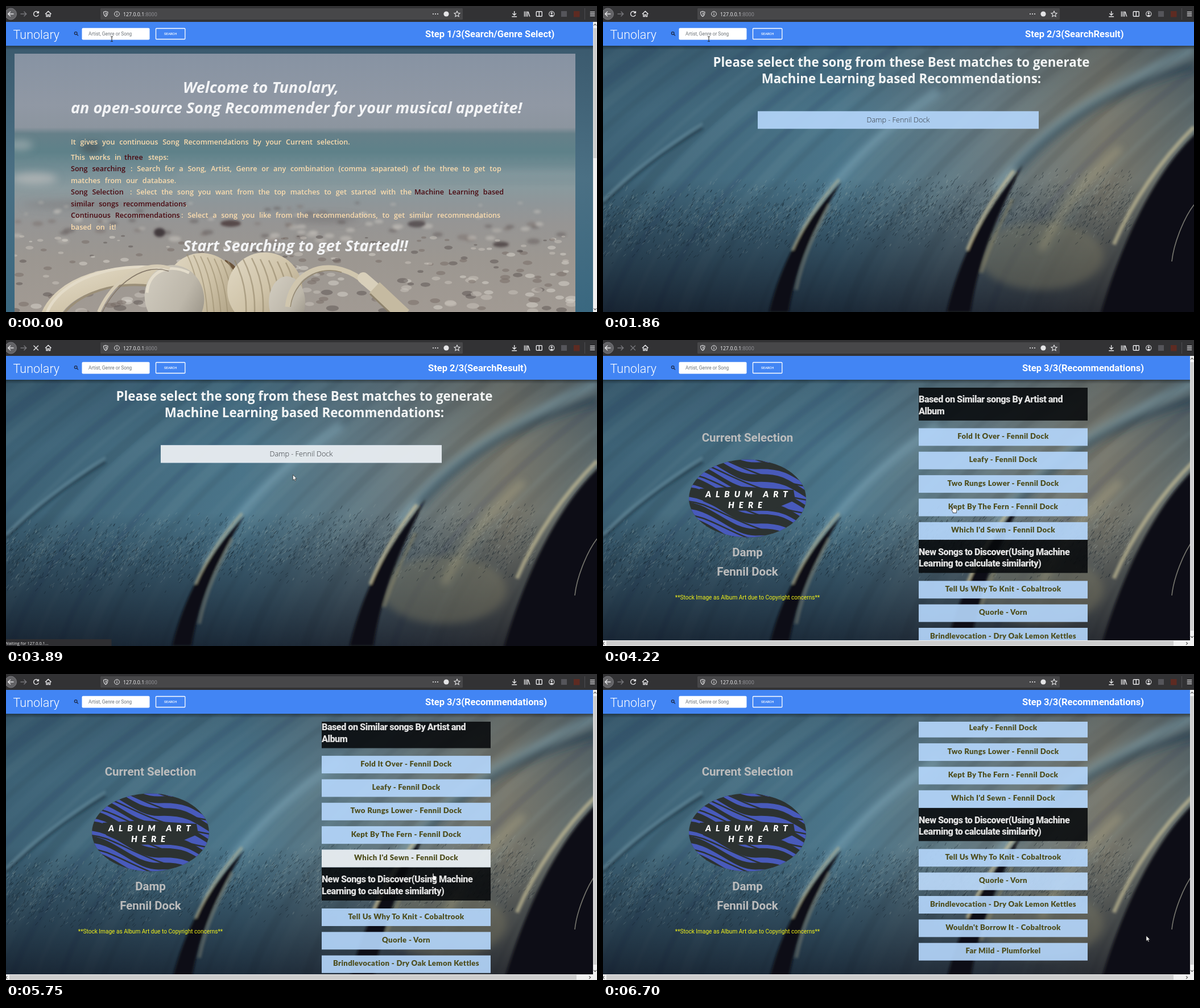
These frames come from a looping animation (1039x539 px, 6780 ms). An HTML page:

```html
<!DOCTYPE html>
<html lang="en">
<head>
<meta charset="utf-8">
<title>Song recommender</title>
<style>
html, body { margin: 0; width: 100%; height: 100%; overflow: hidden; background: #323234; }
svg { display: block; width: 100vw; height: 100vh; }
text { white-space: pre; }
.rb { font-family: Roboto, sans-serif; }
.os { font-family: "Open Sans", sans-serif; }
.hero { font: italic 700 27.1px "Open Sans", sans-serif; fill: #f3f4f6; }
.note { font: 600 12.6px "Open Sans", sans-serif; word-spacing: 4.5px; }
.pick { font: 700 22.3px "Open Sans", sans-serif; fill: #f4f6f6; text-anchor: middle; }
.song { font: 900 13.2px Lato, sans-serif; letter-spacing: .35px; fill: #4d4d1c; text-anchor: middle; }
.head { font: 900 16.2px Roboto, sans-serif; letter-spacing: -.5px; fill: #e2e2e2; }
.side { font: 700 20.5px Roboto, sans-serif; fill: #bcbcbc; text-anchor: middle; }
.art { font: italic 900 15px Lato, sans-serif; letter-spacing: 8px; fill: #fff; }
.icon { fill: none; stroke: #e4e4e6; stroke-width: 1.4; }
</style>
</head>
<body>
<svg id="stage" viewBox="0 0 1039 539" preserveAspectRatio="none"></svg>
<script>
const LOOP = 6780;
const BRAND = 'Tunolary', SONG = 'Damp', BAND = 'Fennil Dock';
const QUERY = 'damp, metal';
const BY_ARTIST = ['Fold It Over', 'Leafy', 'Two Rungs Lower', 'Kept By The Fern', "Which I'd Sewn"]
  .map(s => `${s} - ${BAND}`);
const DISCOVER = ['Tell Us Why To Knit - Cobaltrook', 'Quorle - Vorn', 'Brindlevocation - Dry Oak Lemon Kettles',
  "Wouldn't Borrow It - Cobaltrook", 'Far Mild - Plumforkel'];

let seed = 7;
const rnd = () => (seed = (seed * 16807) % 2147483647) / 2147483647;
const times = (n, f) => Array.from({ length: n }, (_, i) => f(i)).join('');
const rect = (x, y, w, h, fill, more = '') =>
  `<rect x="${x}" y="${y}" width="${w}" height="${h}" fill="${fill}" ${more}/>`;
const text = (x, y, s, more = '') => `<text x="${x}" y="${y}" ${more}>${s}</text>`;
const line = (d, color, w, more = '') =>
  `<path d="${d}" fill="none" stroke="${color}" stroke-width="${w}" ${more}/>`;
const shape = (d, fill, more = '') => `<path d="${d}" fill="${fill}" ${more}/>`;
const oval = (x, y, rx, ry, fill, more = '') =>
  `<ellipse cx="${x}" cy="${y}" rx="${rx}" ry="${ry}" fill="${fill}" ${more}/>`;
const grad = (id, x2, y2, stops) => `<linearGradient id="${id}" x1="0" y1="0" x2="${x2}" y2="${y2}">` +
  stops.map(([o, c, a = 1]) => `<stop offset="${o}" stop-color="${c}" stop-opacity="${a}"/>`).join('') +
  '</linearGradient>';
const blur = (id, s) => `<filter id="${id}" x="-30%" y="-30%" width="160%" height="160%">
  <feGaussianBlur stdDeviation="${s}"/></filter>`;

const defs = `<defs>
  ${grad('tone', 1, 0, [[0, '#3f6579'], [.4, '#4e7a8f'], [.65, '#6b7e85'], [.85, '#7f7d70'], [1, '#5f6b6c']])}
  ${grad('depth', 0, 1, [[0, '#1c3144', .3], [.25, '#1c3144', .08], [.5, '#101a28', .05], [.72, '#101a28', .42], [1, '#0a0e1a', .75]])}
  ${grad('edge', 0, 1, [[0, '#3b5a6e'], [.5, '#4b7084'], [1, '#3a6880']])}
  ${grad('beach', 0, 1, [[0, '#8793a3'], [.2, '#9098a4'], [.285, '#8c959f'], [.31, '#668089'], [.38, '#5e8189'],
    [.46, '#789097'], [.52, '#8a9a9e'], [.58, '#8f9699'], [.66, '#969594'], [.8, '#9c9791'], [1, '#a19a93']])}
  ${grad('cream', 1, 1, [[0, '#e2dac6'], [.5, '#cfc3a8'], [1, '#a39577']])}
  ${grad('pale', 1, 1, [[0, '#d3cec2'], [.6, '#bdb7aa'], [1, '#8f897d']])}
  ${grad('shade', 0, 1, [[0, '#000', .35], [1, '#000', 0]])}
  ${blur('soft', 2)}${blur('haze', 7)}
  <clipPath id="photo"><rect x="15" y="84" width="986" height="455"/></clipPath>
  <clipPath id="list"><rect x="555" y="84" width="298" height="445"/></clipPath>
  <clipPath id="disc"><ellipse cx="254" cy="279" rx="103" ry="68.5"/></clipPath>
</defs>`;

// Short slanted ticks that give the record its grain.
const grain = (n, lo, hi) => times(n, () => {
  const x = rnd() * 930, y = lo + (rnd() + rnd()) / 2 * (hi - lo) - x * .04;
  return `M${x.toFixed(1)} ${y.toFixed(1)}l${(2 + rnd() * 3).toFixed(1)} -${(3 + rnd() * 3).toFixed(1)}`;
});

const streaks = times(34, i => {
  const x = -420 + i * 42 + rnd() * 25;
  return line(`M${x} 539C${x + 40} 410 ${x + 150} 260 ${x + 420} 70`,
    i % 2 ? '#a9c4c8' : '#0e2231', 6 + rnd() * 16, `opacity="${(.03 + rnd() * .06).toFixed(2)}"`);
});

const vinyl = `<g id="vinyl">
  ${rect(0, 70, 1039, 469, 'url(#tone)')}
  <g filter="url(#soft)">${streaks}</g>
  ${rect(0, 70, 1039, 469, 'url(#depth)')}
  ${oval(770, 440, 110, 60, '#8a8468', 'opacity=".35" filter="url(#haze)"')}
  ${line(grain(1500, 320, 460), '#0d1721', 1, 'opacity=".45"')}
  ${line(grain(1300, 315, 450), '#b3c0b8', .8, 'opacity=".3"')}
  <g filter="url(#haze)">
    ${line('M350 400C400 310 470 235 590 150', '#9cc6d8', 12, 'opacity=".5"')}
    ${line('M690 325C740 250 830 170 1039 75', '#85abb9', 16, 'opacity=".5"')}
    ${line('M725 290C790 215 900 140 1039 105', '#1f3a4c', 15, 'opacity=".6"')}
    ${line('M770 430C800 370 840 310 910 250', '#c9bd92', 10, 'opacity=".4"')}
  </g>
  <g filter="url(#soft)">
    ${line('M0 350C50 300 110 255 175 215', '#142a38', 5, 'opacity=".5"')}
    ${line('M0 342C50 292 110 247 175 207', '#8fb4c2', 4, 'opacity=".35"')}
    ${shape('M292 539C314 450 350 385 420 308C368 395 342 450 326 539Z', '#0d0e17')}
    ${line('M333 430C355 380 380 345 415 305', '#b5b396', 4, 'opacity=".75"')}
    ${line('M340 500C352 440 375 395 398 350', '#8c8a78', 5, 'opacity=".5"')}
    ${shape('M604 539C628 440 665 372 738 280C690 375 662 440 646 539Z', '#0e0c14')}
    ${line('M640 430C662 375 688 335 722 290', '#cfc49c', 5, 'opacity=".75"')}
    ${line('M665 470C680 420 700 380 720 340', '#8e8868', 6, 'opacity=".5"')}
    ${shape('M876 539C905 440 960 300 1045 222V545H876Z', '#0c0a14')}
    ${line('M898 420C930 345 980 272 1039 213', '#c4bc98', 7, 'opacity=".7"')}
  </g>
  ${line('M1000 450C1003 420 1020 375 1039 350', '#77776f', 1.6)}
</g>`;

// Pebbles grow and sharpen towards the viewer.
const pebbles = (n, top, depth, opacity) => times(n, () => {
  const near = rnd(), r = 1 + near * 2.5 + rnd() * 2;
  const tones = ['#5a5150', '#756a64', '#c9c3bb', '#dad5ce'];
  return oval((15 + rnd() * 985).toFixed(1), (top + near * depth).toFixed(1), (r * 2.2).toFixed(1), r.toFixed(1),
    tones[Math.floor(rnd() * 4)], `opacity="${opacity}"`);
});

const headphones = `
  ${line('M75 552C95 492 190 460 290 484', 'url(#cream)', 32)}
  ${line('M72 540C95 482 190 450 275 462', '#e3dbc8', 5)}
  ${line('M95 552C120 505 200 480 270 496', '#9b8f78', 4)}
  ${shape('M385 447C415 458 428 500 424 539H372Z', '#6b5339')}
  ${oval(345, 503, 66, 68, 'url(#cream)', 'transform="rotate(-14 345 503)"')}
  ${times(7, i => line(`M${318 + i * 12} ${437 + i * 2}q20 40 24 102`, '#9a8c6f', 2, 'opacity=".6"'))}
  ${oval(296, 514, 52, 58, 'url(#pale)', 'transform="rotate(-14 296 514)"')}
  ${line('M248 505C250 468 285 452 322 470', '#e3dccb', 5)}
  ${line('M163 539C190 478 245 447 288 462', '#d5cbb5', 6)}
  ${line('M168 542C195 484 245 453 286 467', '#85796a', 1.5)}
  ${oval(455, 500, 66, 66, 'url(#cream)')}
  ${times(7, i => line(`M${402 + i * 15} ${444 + Math.abs(i - 2) * 2}q22 42 20 95`, '#93856a', 2.5, 'opacity=".6"'))}
  ${oval(494, 522, 32, 46, 'url(#pale)')}
  ${line('M495 530C500 478 545 450 592 465C610 470 622 478 634 490', '#d0c6ae', 9)}
  ${line('M500 530C506 484 548 456 590 469', '#94886f', 1.5)}
  ${line('M628 479L650 498', '#d8cfba', 20, 'stroke-linecap="round"')}
  ${line('M648 496L700 545', '#c5baa1', 26)}
  ${line('M640 507L684 549', '#8e836d', 3)}`;

const notes = [
  [114, 244, 'It gives you continuous Song Recommendations by your Current selection.'],
  [114, 271, 'This works in'], [208, 271, 'three', 1], [250, 271, 'steps:'],
  [114, 291, 'Song searching', 1],
  [219, 291, ': Search for a Song, Artist, Genre or any combination (comma saparated) of the three to get top'],
  [114, 312, 'matches from our database.'],
  [114, 332, 'Song Selection', 1],
  [218, 332, ': Select the song you want from the top matches to get started with the'],
  [718, 332, 'Machine Learning based', 1],
  [114, 353, 'similar songs recommendations', 1], [315, 353, '.'],
  [114, 373, 'Continuous Recommendations', 1],
  [308, 373, ': Select a song you like from the recommendations, to get similar recommendations'],
  [114, 394, 'based on it!'],
].map(([x, y, s, dark]) => text(x, y, s, `class="note" fill="${dark ? '#4a0910' : '#fbdcae'}"`)).join('');

const home = `<g id="home">
  ${rect(0, 70, 1039, 469, 'url(#edge)')}
  <g clip-path="url(#photo)">
    ${rect(15, 84, 986, 455, 'url(#beach)')}
    <g filter="url(#haze)">
      ${rect(300, 292, 720, 8, '#a3adae', 'opacity=".4"')}
      ${oval(150, 250, 20, 10, '#4a565c', 'opacity=".8"')}${oval(25, 245, 22, 9, '#a3aeb1', 'opacity=".7"')}
      ${oval(50, 304, 40, 10, '#b7bab9', 'opacity=".8"')}
      ${oval(560, 375, 60, 6, '#6f6a69', 'opacity=".6"')}${oval(150, 350, 120, 6, '#7a7777', 'opacity=".6"')}
    </g>
    <g filter="url(#soft)">
      ${pebbles(90, 345, 70, .4)}
      ${oval(270, 399, 10, 8, '#433a3c')}${oval(395, 383, 18, 6, '#56494a')}${oval(722, 384, 16, 6, '#5c5456')}
      ${oval(870, 420, 14, 5, '#58504f')}
    </g>
    ${pebbles(260, 405, 135, .5)}
    ${headphones}
  </g>
  ${text(311, 153, `Welcome to ${BRAND},`, 'class="hero"')}
  ${text(114, 189, 'an open-source Song Recommender for your musical appetite!', 'class="hero"')}
  ${notes}
  ${text(311, 432, 'Start Searching to get Started!!', 'class="hero"')}
</g>`;

const button = (x, y, w, id) =>
  rect(x, y, w, 31, '#b4d5fa', 'opacity=".92"') + rect(x, y, w, 31, '#e5e9eb', `id="${id}" opacity="0"`);

const results = `<g id="results">
  ${text(524.5, 107, 'Please select the song from these Best matches to generate', 'class="pick"')}
  ${text(524.5, 136, 'Machine Learning based Recommendations:', 'class="pick"')}
  ${button(272, 185.3, 494, 'hitOne')}
  ${text(519, 205, `${SONG} - ${BAND}`, 'class="os" font-size="12.7" font-weight="300" fill="#2f3338" text-anchor="middle"')}
</g>`;

const songs = (names, top, id) => names.map((s, i) => {
  const y = top + i * 41.35;
  return button(555, y, 297, id + i) + text(703.5, y + 18.6, s, 'class="song"');
}).join('');
const banner = (y, a, b) => rect(555, y, 297, 58.3, '#070a0c', 'opacity=".88"') +
  text(555, y + 26.5, a, 'class="head"') + text(555, y + 47.3, b, 'class="head"');

const swoosh = times(9, i => {
  const y = 190 + i * 24;
  return line(`M130 ${y - 30}C190 ${y - 35} 220 ${y + 20} 270 ${y + 18}S330 ${y + 30} 375 ${y + 58}`,
    '#485abb', i % 3 ? 6 + i % 4 * 3 : 15) +
    line(`M140 ${y - 26}C195 ${y - 28} 230 ${y + 24} 370 ${y + 46}`, '#2c3231', 2.5);
});

const recs = `<g id="recs">
  ${text(254, 179, 'Current Selection', 'class="side"')}
  ${oval(254, 279, 103, 68.5, '#2c3231')}
  <g clip-path="url(#disc)">${swoosh}
    ${shape('M170 262L240 258L335 264L338 282L295 300L215 301L176 284Z', '#2c3231')}</g>
  ${text(180, 277, 'ALBUM ART', 'class="art"')}${text(220, 296, 'HERE', 'class="art"')}
  ${text(254, 381, SONG, 'class="side"')}${text(254, 415, BAND, 'class="side"')}
  ${text(254, 457, '**Stock Image as Album Art due to Copyright concerns**',
    'class="rb" font-size="10.1" fill="#f2f218" text-anchor="middle"')}
  <g clip-path="url(#list)"><g id="scroller">
    ${banner(83.6, 'Based on Similar songs By Artist and', 'Album')}
    ${songs(BY_ARTIST, 155.4, 'a')}
    ${banner(352, 'New Songs to Discover(Using Machine', 'Learning to calculate similarity)')}
    ${songs(DISCOVER, 424.3, 'd')}
  </g></g>
</g>`;

const bar = `
  ${rect(0, 70, 1039, 7, 'url(#shade)')}
  ${rect(0, 28, 1039, 42, '#4285f4')}
  ${text(12.5, 57.5, BRAND, 'class="rb" font-size="21.5" font-weight="300" fill="#fff"')}
  <g fill="none" stroke="#1d2b4a" stroke-width="1.3"><circle cx="122.7" cy="48" r="2.3"/><path d="M124.4 49.8L127 52.4"/></g>
  ${rect(133.5, 38.8, 119, 20.6, '#fff', 'rx="2"')}
  ${text(145, 52, 'Artist, Genre or Song', 'id="hint" class="rb" font-size="8.3" fill="#6b7278"')}
  ${text(140.5, 52, QUERY, 'id="typed" class="rb" font-size="8.8" fill="#40454a"')}
  ${rect(190, 44, 1, 10, '#222', 'id="caret"')}
  <g id="popup">${rect(134, 60, 120, 69, '#fff', 'stroke="#b8b8b8" stroke-width=".6"')}
    ${rect(134.5, 61, 119, 13.4, '#d9d9dc', 'id="row"')}
    ${[QUERY, 'metal', 'rock, piano', 'slow jazz', 'blues'].map((s, i) =>
      text(140.5, 70.5 + i * 13.5, s, 'class="rb" font-size="8.3" fill="#33373b"')).join('')}</g>
  ${rect(263.5, 39.5, 51.3, 19, 'none', 'stroke="#fff" stroke-width="1.3" rx="1"')}
  ${text(289.2, 51, 'SEARCH', 'class="rb" font-size="5.8" font-weight="500" fill="#fff" text-anchor="middle"')}
  ${text(737, 55, '', 'id="step" class="rb" font-size="16.5" font-weight="700" fill="#fff"')}`;

const chevron = (x, y, turn) =>
  `<path d="M-2.4 1.4L0 -1.2L2.4 1.4" fill="none" stroke="#505050" stroke-width="1.1" transform="translate(${x} ${y}) rotate(${turn})"/>`;
const bars = `
  <g id="vbar">${rect(1032, 28, 7, 511, '#f0f0f0')}${rect(1032.6, 39, 5.8, 229, '#cdcdcd', 'id="thumb"')}
    ${chevron(1035.6, 33, 0)}<g id="down">${chevron(1035.6, 534, 180)}</g></g>
  <g id="hbar">${rect(0, 529, 1039, 10, '#f0f0f0')}${rect(6, 530, 997, 8.4, '#cdcdcd')}
    ${chevron(1, 534.5, -90)}${chevron(1026.5, 534.5, 90)}</g>`;

const chrome = `
  ${rect(0, 0, 1039, 28, '#323234')}
  ${rect(166, 4, 637, 20, '#474749', 'rx="1.5"')}
  <circle cx="8.5" cy="14" r="10" fill="#636366" stroke="#85858a" stroke-width=".8"/>
  <g class="icon">
    <path d="M13.5 14H4M8 9.7L3.7 14L8 18.3"/>
    <path d="M25.5 14H35.5M31.5 9.7L35.8 14L31.5 18.3" stroke="#77777b"/>
    <path id="reload" d="M56.6 11.4A4.4 4.4 0 1 0 57.2 15.3M57.4 9V12.3H54"/>
    <path id="stop" d="M48.5 9.7L57 18.2M57 9.7L48.5 18.2"/>
    <path d="M69 14.3L74.3 9.3L79.6 14.3M71 13.5V18.6H73.2V15.4H75.4V18.6H77.6V13.5"/>
    <path d="M175.3 9.4L179 10.6C179 14.5 178.2 17 175.3 18.6C172.4 17 171.6 14.5 171.6 10.6Z" stroke-width="1.1"/>
    <path d="M175.3 11.4V16.5Q177 15 177 12Z" fill="#e4e4e6" stroke="none"/>
    <circle cx="195" cy="14" r="4.4" stroke-width="1"/><path d="M195 13.2V16.6M195 11V12.2" stroke-width="1.1"/>
    <path d="M793 9L794.5 12.3L798 12.7L795.4 15.1L796.1 18.6L793 16.8L789.9 18.6L790.6 15.1L788 12.7L791.5 12.3Z" stroke-width="1.1"/>
    <path d="M893.7 9V16M890.5 13L893.7 16.2L896.9 13M889.3 18.7H898.1"/>
    <path d="M911.5 9.5V18.8M914.3 9.5V18.8M916.8 9.5V18.8M917.9 10L920.8 18.6"/>
    <rect x="932.3" y="9.8" width="10" height="8.4" rx="1"/><path d="M937.3 10V18"/>
    <circle cx="959.3" cy="14" r="4.6" stroke-width="1.1"/>
    <path d="M1017.5 4V24" stroke="#55555a" stroke-width=".8"/>
    <path d="M1026.8 10.6H1035.2M1026.8 14H1035.2M1026.8 17.4H1035.2"/>
  </g>
  <g fill="#e4e4e6">${times(3, i => `<circle cx="${751 + i * 4}" cy="14" r="1.1"/>`)}
    <circle cx="774" cy="14" r="4.6"/><circle cx="959.3" cy="12.6" r="1.7"/>
    <path d="M956.3 16.8Q959.3 13.6 962.3 16.8Q959.3 19 956.3 16.8Z"/></g>
  ${rect(976, 9, 10, 10, '#55555a')}${rect(998, 9, 10.5, 10.5, '#5e2b22')}
  ${text(206, 17.6, '127.0.0.1<tspan fill="#96969b">:8000</tspan>', 'class="os" font-size="8.8" fill="#f4f4f6"')}
  <g id="status">${rect(0, 527, 185.5, 12, '#2e2e31')}
    ${text(-2, 537, 'Waiting for 127.0.0.1...', 'class="os" font-size="7.4" fill="#eee"')}</g>`;

const pointer = `<g id="pointer">
  <path id="beam" d="M-2 -3.2H-.5L0 -2.7L.5 -3.2H2M0 -2.7V5M-2 5.4H-.5L0 5L.5 5.4H2" fill="none" stroke="#222" stroke-width="1"/>
  <path id="arrow" d="M0 0V9.6L2.2 7.6L3.7 10.9L5.2 10.2L3.7 7H6.6Z" fill="#fff" stroke="#222" stroke-width=".7"/>
  <path id="hand" d="M-1 .6Q0 -.8 1 .6V4.4L5 5.2Q6.3 5.6 6.2 7L5.4 10.4V12.6H-.8V11L-3.6 7.6Q-3.8 6 -2.4 6.4L-1 7.6Z"
    fill="#fff" stroke="#222" stroke-width=".8" stroke-linejoin="round"/>
</g>`;

const stage = document.getElementById('stage');
stage.innerHTML = defs + vinyl + home + results + recs + bar + bars + chrome + pointer;

const nodes = {};
const cache = {};
const el = id => nodes[id] || (nodes[id] = document.getElementById(id));
function set(id, name, value) {
  const key = id + name;
  if (cache[key] === value) return;
  cache[key] = value;
  if (name === 'text') el(id).textContent = value;
  else el(id).setAttribute(name, value);
}
const show = (id, on) => set(id, 'display', on ? 'inline' : 'none');
const within = (t, a, b) => t >= a && t < b;

// Eased value along [time, ...values] keys.
function along(keys, t) {
  const i = keys.findIndex(k => k[0] > t);
  if (i < 0) return keys[keys.length - 1].slice(1);
  if (i === 0) return keys[0].slice(1);
  const a = keys[i - 1], b = keys[i];
  const u = (t - a[0]) / (b[0] - a[0]), e = u * u * (3 - 2 * u);
  return a.slice(1).map((v, j) => v + (b[j + 1] - v) * e);
}

const PATH = [[0, 186, 57], [2290, 186, 57], [2650, 562, 316], [2945, 426, 199], [3710, 426, 199], [4120, 616, 292],
  [4420, 616, 292], [4750, 705, 386], [5050, 751, 351], [6420, 751, 351], [6690, 955, 461]];
const SCROLL = [[5700, 0], [5920, 83], [6150, 116]];
const HOVER = { hitOne: [2945, 9999], a3: [4360, 4520], a4: [4970, 6200], d1: [6230, 6570] };
const FADE = 150;
const STEPS = ['1/3(Search/Genre Select)', '2/3(SearchResult)', '3/3(Recommendations)'];
const clamp = v => Math.max(0, Math.min(1, v));

function render(t) {
  const page = t < 1620 ? 0 : t < 4130 ? 1 : 2;
  ['home', 'results', 'recs'].forEach((id, i) => show(id, i === page));
  show('vinyl', page > 0);
  set('step', 'text', 'Step ' + STEPS[page]);
  set('step', 'x', page === 1 ? 742 : 737);

  const filled = within(t, 330, 1620);
  show('hint', !filled);
  show('typed', filled);
  show('caret', within(t, 330, 880));
  show('popup', within(t, 80, 330));
  show('row', t >= 160);

  const loading = within(t, 1040, 1860) || within(t, 3480, 4440);
  show('stop', loading);
  show('reload', !loading);
  set('stop', 'stroke', page === 2 ? '#77777b' : '#e4e4e6');
  show('status', within(t, 1040, 1620) || within(t, 3730, 4130));

  show('vbar', page !== 1);
  show('hbar', page === 2);
  set('thumb', 'height', page === 2 ? 473 : 229);
  set('down', 'transform', page === 2 ? 'translate(0 -11)' : '');

  for (const id in HOVER) {
    const [on, off] = HOVER[id];
    set(id, 'opacity', (clamp((t - on) / FADE) * (1 - clamp((t - off) / FADE)) * .95).toFixed(3));
  }
  set('scroller', 'transform', `translate(0 ${(-along(SCROLL, t)[0]).toFixed(2)})`);

  const [x, y] = along(PATH, t);
  const hand = within(t, 2900, 3730) || within(t, 4130, 4540) || within(t, 4970, 6460);
  set('pointer', 'transform', `translate(${x.toFixed(2)} ${y.toFixed(2)})`);
  show('beam', t < 2310);
  show('hand', hand);
  show('arrow', t >= 2310 && !hand);
}

const start = performance.now();
function tick() {
  render((performance.now() - start) % LOOP);
  requestAnimationFrame(tick);
}
tick();
</script>
</body>
</html>
```
